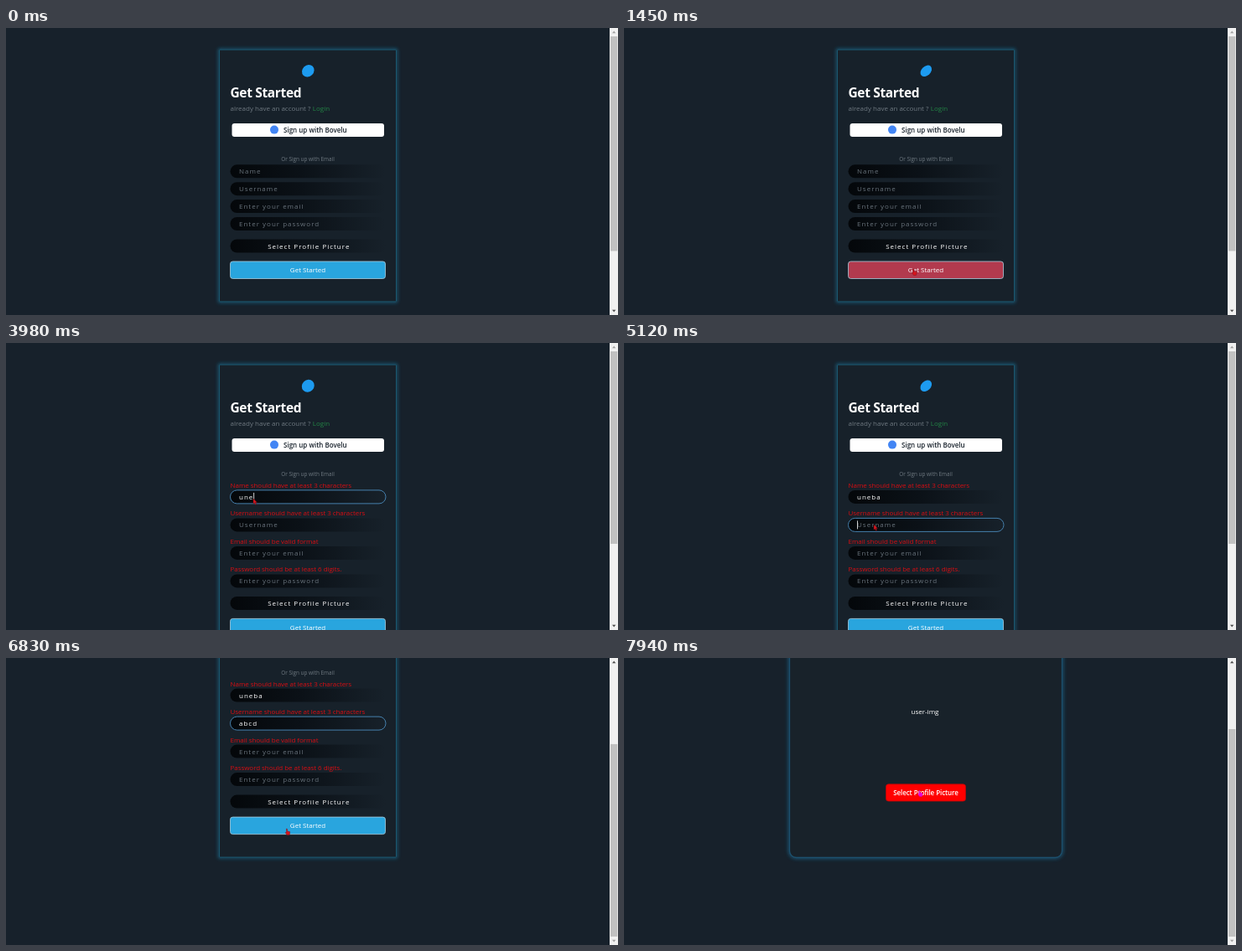
An HTML page that plays this animation: 730 by 343 pixels, repeating every 8 s.

```html
<!DOCTYPE html>
<html lang="en">
<head>
<meta charset="utf-8">
<title>Sign-up form</title>
<style>
  html, body { margin: 0; width: 100%; height: 100%; overflow: hidden; background: #17212b; }
  svg { display: block; width: 100%; height: 100%; }
  text { font: 8px 'Open Sans', 'Noto Sans', sans-serif; fill: #fff; white-space: pre; }
  .mid { text-anchor: middle; }
  .semi { font-weight: 600; }
  .wide { letter-spacing: 1px; }
  .gray { fill: #6f7981; }
  .hint { fill: #69737c; }
  .error { fill: #d80d12; letter-spacing: -.05px; }
</style>
</head>
<body>
<svg id="stage" viewBox="0 0 730 343">
  <defs>
    <linearGradient id="dark">
      <stop offset="0" stop-color="#04070a"/>
      <stop offset=".45" stop-color="#0b1117"/>
      <stop offset="1" stop-color="#17212a"/>
    </linearGradient>
    <filter id="blur" filterUnits="userSpaceOnUse" x="180" y="-300" width="360" height="800">
      <feGaussianBlur stdDeviation="2.2"/>
    </filter>
  </defs>
  <rect width="730" height="343" fill="#17212b"/>

  <g id="form">
    <rect class="card" x="254.5" y="26" width="211" fill="none" stroke="#1c7fa8" stroke-width="2.4" opacity=".75" filter="url(#blur)"/>
    <rect class="card" x="254.5" y="26" width="211" rx="1" fill="#17212a" stroke="#1b5870"/>
    <circle id="logo" r="7.8" fill="#1d9bf0"/>
    <text x="267.5" y="83" style="font-size:15.5px;font-weight:700;letter-spacing:-.35px">Get Started</text>
    <text class="gray" x="267.5" y="98.6">already have an account ?</text>
    <text x="365.8" y="98.6" style="fill:#238445">Login</text>
    <rect x="269.5" y="114" width="181.5" height="16" rx="3" fill="#fff"/>
    <circle cx="320" cy="121.6" r="5" fill="#4285f4"/>
    <text class="semi" x="331" y="124.7" style="fill:#17212b">Sign up with Bovelu</text>
    <text class="gray mid" x="360" y="159.3" style="font-size:6.4px">Or Sign up with Email</text>
    <g id="fields"></g>
    <g id="actions">
      <rect x="267.5" y="252.5" width="186" height="16" rx="8" fill="url(#dark)"/>
      <text class="mid wide" x="361.3" y="263.5">Select Profile Picture</text>
      <rect id="submit" x="267.5" y="279" width="185" height="20.5" rx="3" stroke="#a9cddd" stroke-width=".8"/>
      <text class="mid" x="360" y="292.3">Get Started</text>
    </g>
  </g>

  <g id="profile">
    <rect x="197.5" y="-60" width="325" height="298.5" rx="8" fill="none" stroke="#1c6f9a" stroke-width="3" opacity=".75" filter="url(#blur)"/>
    <rect x="197.5" y="-60" width="325" height="298.5" rx="8" fill="#18222a" stroke="#1d506e" stroke-width="1.3"/>
    <text class="mid" x="359" y="67">user-img</text>
    <rect id="pick" x="312.5" y="150.8" width="95" height="20.3" rx="3" stroke-width=".8"/>
    <text class="mid semi" x="360" y="164" style="letter-spacing:-.08px">Select Profile Picture</text>
  </g>

  <rect x="720" width="10" height="343" fill="#f1f1f1"/>
  <rect id="thumb" x="721" width="8.3" fill="#c1c1c1"/>
  <path id="up" d="M723 6.2h4.4l-2.2-2.6z"/>
  <path id="down" d="M723 336.8h4.4l-2.2 2.6z"/>
  <path id="pointer" stroke-width=".4"/>
</svg>

<script>
const LOOP = 8000;
const ERRORS_AT = 1730, SCROLL_AT = 6370, PROFILE_AT = 7150;
const BLUE = [41, 165, 222], ROSE = [178, 58, 78], RED = [255, 0, 0];
const ARROW = 'M0 0V6.2L1.5 4.9L2.5 7.2L3.5 6.8L2.6 4.6H4.5Z';
const HAND = 'M1 0Q2 0 2 1V3L5 3.6V6L4.3 7.6H1.6L-.4 4.8L.3 4.2L.9 4.6V0Z';

const fields = [
  { hint: 'Name', error: 'Name should have at least 3 characters',
    value: 'uneba', keys: [3600, 3800, 3960, 4150, 4320], focus: [2760, 4950] },
  { hint: 'Username', error: 'Username should have at least 3 characters',
    value: 'abcd', keys: [5300, 5450, 5670, 5820], focus: [4950, PROFILE_AT] },
  { hint: 'Enter your email', error: 'Email should be valid format' },
  { hint: 'Enter your password', error: 'Password should be at least 6 digits.' }
];

// time, x, y of the pointer tip
const route = [
  [700, 402, 322], [1150, 344, 288], [1730, 344, 288], [2390, 300, 197.5],
  [2620, 295, 186], [4440, 295, 186], [4850, 298, 217], [6400, 298, 217],
  [6800, 333.5, 204], [7150, 338, 202], [7480, 456, 168], [7900, 351, 158]
];

const $ = id => document.getElementById(id);
const set = (el, attrs) => { for (const k in attrs) el.setAttribute(k, attrs[k]); };
const show = (el, on) => el.setAttribute('visibility', on ? 'inherit' : 'hidden');
const ramp = (t, from, to) => Math.min(1, Math.max(0, (t - from) / (to - from)));
const ease = p => p * p * (3 - 2 * p);
const mix = (a, b, p) => `rgb(${a.map((v, i) => Math.round(v + (b[i] - v) * p))})`;

function add(parent, tag, attrs, text = '') {
  const el = document.createElementNS('http://www.w3.org/2000/svg', tag);
  set(el, attrs);
  el.textContent = text;
  return parent.appendChild(el);
}

for (const f of fields) {
  f.group = add($('fields'), 'g', {});
  f.warning = add(f.group, 'text', { class: 'error', x: 267.5, y: -11 }, f.error);
  f.box = add(f.group, 'rect', { x: 267.5, y: -8, width: 185.5, height: 16, rx: 8, fill: 'url(#dark)' });
  f.text = add(f.group, 'text', { x: 278, y: 2.9 });
  f.caret = add(f.group, 'rect', { y: -5, width: .8, height: 10, fill: '#fff' });
}

function drawField(f, i, t, failed) {
  const keys = f.keys || [];
  const typed = keys.filter(k => t >= k).length;
  const focused = !!f.focus && t >= f.focus[0] && t < f.focus[1];
  set(f.group, { transform: `translate(0 ${171.3 + 20.9 * i + (failed ? 12.6 * (i + 1) : 0)})` });
  show(f.warning, failed);
  set(f.box, { stroke: focused ? '#4580ad' : 'none' });
  set(f.text, { class: typed ? 'wide' : 'wide hint' });
  const label = typed ? f.value.slice(0, typed) : f.hint;
  if (f.text.textContent !== label) f.text.textContent = label;
  const since = focused ? t - (typed ? keys[typed - 1] : f.focus[0]) : 0;
  show(f.caret, focused && Math.floor(since / 530) % 2 === 0);
  if (focused) set(f.caret, { x: 278 + (typed ? f.text.getComputedTextLength() : 0) });
}

function drawPointer(t, onProfile) {
  const visible = t > 700 && !(t > 5300 && t < 6400);
  show($('pointer'), visible);
  if (!visible) return;
  let i = 0;
  while (i < route.length - 2 && t >= route[i + 1][0]) i++;
  const [a, b] = [route[i], route[i + 1]];
  const p = ease(ramp(t, a[0], b[0]));
  const x = a[1] + (b[1] - a[1]) * p, y = a[2] + (b[2] - a[2]) * p;
  const overPick = onProfile && t > 7700;
  const hand = overPick || (t > 1000 && t < 1850) || (t > 6700 && !onProfile);
  set($('pointer'), {
    d: hand ? HAND : ARROW,
    transform: `translate(${x} ${y})`,
    fill: overPick ? '#f000d8' : '#d8141c',
    stroke: overPick ? '#c000c0' : '#6d1018'
  });
}

function draw(t) {
  const failed = t >= ERRORS_AT, onProfile = t >= PROFILE_AT;
  const scroll = 139.3 * ease(ramp(t, SCROLL_AT, 6550));
  const push = failed ? 50.4 : 0;

  show($('form'), !onProfile);
  show($('profile'), onProfile);
  set($('form'), { transform: `translate(0 ${-scroll})` });
  set($('actions'), { transform: `translate(0 ${push})` });
  document.querySelectorAll('.card').forEach(c => set(c, { height: 301 + push }));
  fields.forEach((f, i) => drawField(f, i, t, failed));

  const squash = .85 + .15 * Math.cos((t - 2390) / 1940 * 2 * Math.PI);
  set($('logo'), { transform: `translate(360.3 51.3) rotate(-45) scale(1 ${squash})` });

  const hover = ramp(t, 1000, 1200) * (1 - ramp(t, 1730, 1900)) + ramp(t, 6860, 7000);
  set($('submit'), { fill: mix(BLUE, ROSE, hover) });
  const pick = mix(BLUE, RED, ramp(t, 7680, 7780));
  set($('pick'), { fill: pick, stroke: t > 7720 ? '#b80808' : pick });

  set($('thumb'), onProfile ? { y: 85, height: 248 }
    : { y: 10 + scroll * .667, height: failed ? 230 : 256.5 });
  set($('up'), { fill: scroll > 0 ? '#505050' : '#a3a3a3' });
  set($('down'), { fill: scroll > 139 ? '#a3a3a3' : '#505050' });
  drawPointer(t, onProfile);
}

const start = performance.now();
function tick() {
  draw((performance.now() - start) % LOOP);
  requestAnimationFrame(tick);
}
tick();
</script>
</body>
</html>
```
